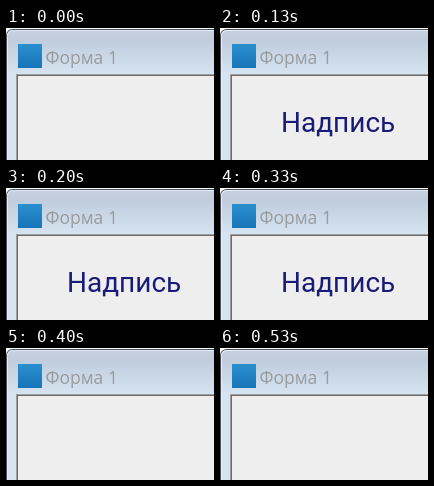
An HTML page for the animation above (670 ms loop, 208x132 px).

```html
<!DOCTYPE html>
<html lang="ru">
<head>
<meta charset="utf-8">
<style>
  html, body { margin: 0; width: 100%; height: 100%; overflow: hidden; background: #fff; }
  svg { display: block; }
  .title { font: 17.5px "Open Sans", "Noto Sans", sans-serif; fill: #999b9e; }
  .label { font: 28px Roboto, sans-serif; fill: #1a1a78; }
</style>
</head>
<body>
<svg width="208" height="132" viewBox="0 0 208 132">
  <defs>
    <linearGradient id="bar" gradientUnits="userSpaceOnUse" x1="0" y1="2" x2="0" y2="46">
      <stop offset="0" stop-color="#c5d1df"/>
      <stop offset=".25" stop-color="#c0cddd"/>
      <stop offset="1" stop-color="#d6e3f0"/>
    </linearGradient>
    <linearGradient id="icon" x1="0" y1="0" x2="0" y2="1">
      <stop offset="0" stop-color="#2b8fce"/>
      <stop offset="1" stop-color="#1674b8"/>
    </linearGradient>
  </defs>
  <path d="M.5 140V8Q.5 1.5 7 1.5H216V140Z" fill="url(#bar)" stroke="#4a4f57"/>
  <path d="M1.5 140V8.5Q1.5 2.5 7.5 2.5H216" fill="none" stroke="#e6edf6"/>
  <rect x="12" y="16" width="24" height="24" fill="url(#icon)"/>
  <text class="title" x="39.5" y="36">Форма 1</text>
  <!-- sunken client area -->
  <rect x="10.5" y="46.5" width="210" height="100" fill="#eee" stroke="#a0a0a0"/>
  <rect x="11.5" y="47.5" width="210" height="100" fill="none" stroke="#696969"/>
  <text class="label" id="label" x="61" y="104" visibility="hidden">Надпись</text>
</svg>
<script>
  const LOOP = 670, SHOW = 70, HIDE = 400;
  const label = document.getElementById("label");

  function draw(now) {
    const t = now % LOOP;
    label.setAttribute("visibility", t >= SHOW && t < HIDE ? "visible" : "hidden");
    requestAnimationFrame(draw);
  }
  draw(performance.now());
</script>
</body>
</html>
```
